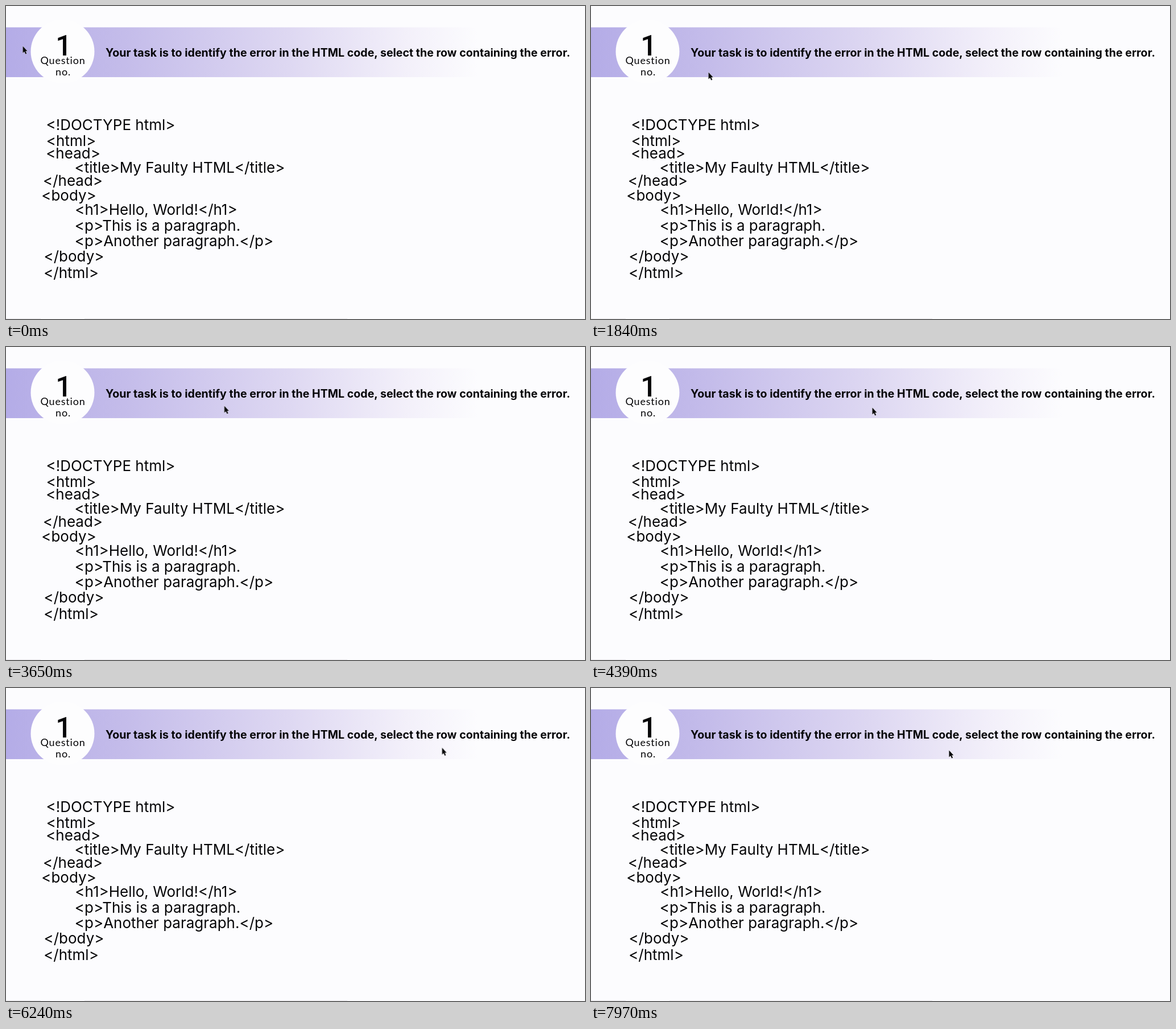
An HTML page that plays this animation: 1018 px wide and 550 px high, repeating every 8 s.

```html
<!DOCTYPE html>
<html lang="en">
<head>
<meta charset="utf-8">
<title>Find the error</title>
<style>
  html, body { margin: 0; width: 100%; height: 100%; overflow: hidden; background: #fcfcfe; }
  svg { display: block; width: 1018px; height: 550px; }
  text { text-anchor: middle; fill: #050507; font-optical-sizing: none; }
  .task { font: 700 19.6px Inter, sans-serif; }
  .number { font: 500 50px Roboto, sans-serif; }
  .label { font: 400 18px Lato, sans-serif; letter-spacing: .8px; }
  #code { font: 400 26px Inter, sans-serif; }
</style>
</head>
<body>
<svg viewBox="0 0 1018 550">
  <defs>
    <linearGradient id="fade" gradientUnits="userSpaceOnUse" x1="0" x2="830" y1="0" y2="0">
      <stop offset="0" stop-color="#b4ace7"/>
      <stop offset=".25" stop-color="#c4bcea"/>
      <stop offset=".6" stop-color="#ded8f2"/>
      <stop offset=".85" stop-color="#f3f0fa"/>
      <stop offset="1" stop-color="#fcfcfe"/>
    </linearGradient>
  </defs>
  <rect width="1018" height="550" fill="#fcfcfe"/>
  <rect y="37.5" width="830" height="87.5" fill="url(#fade)"/>
  <circle cx="99.5" cy="80" r="56" fill="#fdfdfe"/>
  <path d="M0 549.5H61M138 549.5H600" stroke="#e9e8ec"/>
  <text class="number" x="101.5" y="86.5">1</text>
  <text class="label" x="100" y="102">Question</text>
  <text class="label" x="100.5" y="122">no.</text>
  <text class="task" x="583.5" y="88.5">Your task is to identify the error in the HTML code, select the row containing the error.</text>
  <g id="code"></g>
  <path id="cursor" d="M.5 .5V12.5L3.2 10 5.2 14.5 7.2 13.6 5.2 9.2H8.5Z" fill="#08080a"
        stroke="#fff" stroke-width=".7" paint-order="stroke"/>
</svg>
<script>
  // Centre x, baseline y, text
  const lines = [
    [184, 218, '<!DOCTYPE html>'],
    [114.5, 246, '<html>'],
    [118, 267.5, '<head>'],
    [305.5, 293, '<title>My Faulty HTML</title>'],
    [117.5, 315.5, '</head>'],
    [110.5, 342, '<body>'],
    [264, 367, '<h1>Hello, World!</h1>'],
    [266.5, 395, '<p>This is a paragraph.'],
    [295.5, 422, '<p>Another paragraph.</p>'],
    [119.5, 449, '</body>'],
    [114.5, 477.5, '</html>']
  ];
  const code = document.getElementById('code');
  for (const [x, y, content] of lines) {
    const line = document.createElementNS('http://www.w3.org/2000/svg', 'text');
    line.setAttribute('x', x);
    line.setAttribute('y', y);
    line.textContent = content;
    code.append(line);
  }

  // Time in ms, tip x, tip y, easing to the next stop
  const LOOP = 8000;
  const stops = [
    [0, 29, 70, 'linear'],
    [1840, 206, 116, 'linear'],
    [2940, 277, 100, 'linear'],
    [4390, 494, 106, 'linear'],
    [5490, 589, 103, 'linear'],
    [7020, 950, 106, 'ease-out'],
    [7340, 997, 107, 'ease-in-out'],
    [7970, 629, 109, 'linear'],
    [LOOP, 629, 109, 'linear']
  ];
  document.getElementById('cursor').animate(
    stops.map(([time, x, y, easing]) => ({
      offset: time / LOOP, transform: `translate(${x}px, ${y}px)`, easing
    })),
    { duration: LOOP, iterations: Infinity }
  );
</script>
</body>
</html>
```
